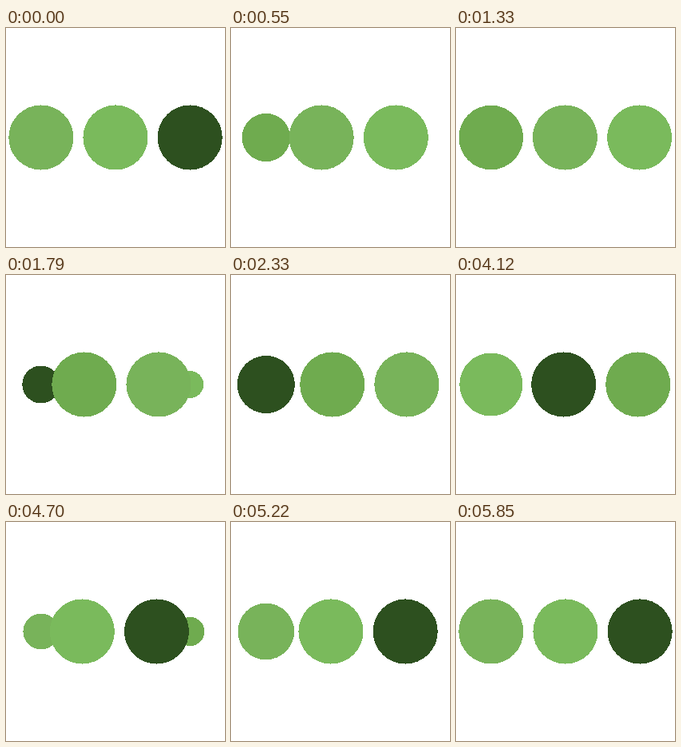
An HTML page without scripts that plays this animation: 274x274 px, repeating every 5880 ms.

```html
<!DOCTYPE html>
<html lang="en">
<head>
<meta charset="utf-8">
<title>Loading dots</title>
<style>
  :root {
    --loop: 5.88s;
    --step: 1.47s;
    --lag: 2ms; /* the first instant still shows the dots at rest */
    --ease: cubic-bezier(0, .5, .5, 1);
    --leaf: #78b35a;
    --lime: #7aba5c;
    --pine: #2d501f;
    --moss: #6fab4f;
  }
  html, body {
    margin: 0;
    width: 100%;
    height: 100%;
    overflow: hidden;
    background: #fff;
  }
  svg { display: block; width: 100vw; height: 100vh; }
  circle { cy: 137px; shape-rendering: crispEdges; }

  /* wait, grow on the left, move to the middle, move to the right */
  .dot {
    fill: var(--color);
    animation: travel var(--loop) var(--ease) infinite;
    animation-delay: calc(var(--lag) - var(--loop) - var(--step) * var(--lead));
  }
  @keyframes travel {
    0%, 25% { cx: 43.84px; r: 0px; }
    50% { cx: 43.84px; r: 40.55px; }
    75% { cx: 137px; r: 40.55px; }
    100% { cx: 230.16px; r: 40.55px; }
  }

  /* the dot leaving on the right takes a new colour each step */
  .exit {
    cx: 230.16px;
    animation: shrink var(--step) var(--ease) infinite,
               recolor var(--loop) step-end infinite;
    animation-delay: calc(var(--lag) - var(--loop));
  }
  @keyframes shrink {
    from { r: 40.55px; }
    to { r: 0px; }
  }
  @keyframes recolor {
    0%, 100% { fill: var(--pine); }
    25% { fill: var(--lime); }
    50% { fill: var(--leaf); }
    75% { fill: var(--moss); }
  }
</style>
</head>
<body>
<svg viewBox="0 0 274 274">
  <circle class="exit"/>
  <circle class="dot" style="--color: var(--pine); --lead: 0"/>
  <circle class="dot" style="--color: var(--moss); --lead: 1"/>
  <circle class="dot" style="--color: var(--leaf); --lead: 2"/>
  <circle class="dot" style="--color: var(--lime); --lead: 3"/>
</svg>
</body>
</html>
```
